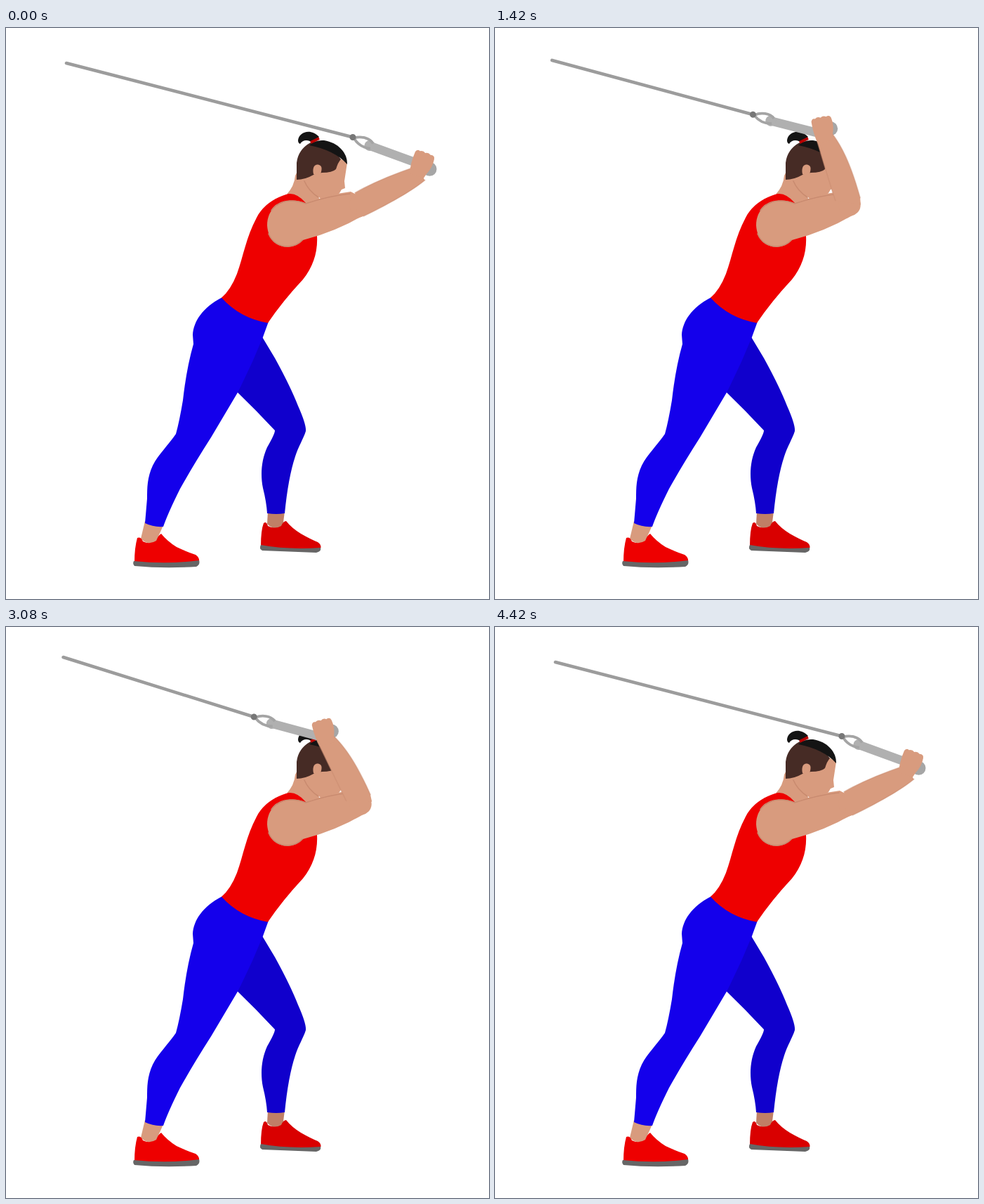
These frames come from a looping animation (688x813 px, 4460 ms). An HTML page:

```html
<!DOCTYPE html>
<html lang="en">
<head>
<meta charset="utf-8">
<title>Cable triceps extension</title>
<style>
html, body { margin: 0; width: 100%; height: 100%; overflow: hidden; background: #fff; }
svg { display: block; width: 688px; height: 813px; }
.skin { fill: #d89b7e; }
.crease { fill: none; stroke: #c98b70; stroke-width: 1.6; stroke-linecap: round; }
</style>
</head>
<body>
<svg viewBox="0 0 688 813">
  <!-- far leg -->
  <path fill="#c07f66" d="M373 688L372 706Q380 715 394 712L397 688Z"/>
  <path fill="#d90000" d="M367 705Q371 702 373 709Q383 714 392 709Q395 702 399 702Q407 712 420 720Q434 728 444 732Q450 736 448 741Q400 743 363 738Q363 715 367 705Z"/>
  <path fill="#666" d="M363 736Q400 743 448 740Q450 745 442 747L365 744Q360 741 363 736Z"/>
  <path fill="#1000cc" d="M362 435L383 470Q405 510 416 538Q428 565 427 574C424 584 416 597 412 610Q402 640 397 691Q385 693 372 691Q371 675 366 655C362 635 364 615 372 597Q383 578 383 573Q357 545 328 517Z"/>
  <!-- near leg -->
  <path class="skin" d="M198 702L192 727Q200 736 213 733L225 706Z"/>
  <path fill="#e00" d="M187 726Q192 724 195 731Q205 736 214 730Q217 722 221 720Q230 731 243 739Q258 746 270 750Q276 754 275 760Q250 766 183 761Q183 740 187 726Z"/>
  <path fill="#666" d="M182 759Q230 764 275 758Q277 764 271 767Q225 770 183 766Q180 763 182 759Z"/>
  <path fill="#1400eb" d="M307 384C280 398 267 418 266 437L267 450Q257 485 252 530Q247 560 242 578C232 593 217 607 209 623C201 640 201 655 201 670L198 705Q210 711 224 710Q231 690 248 656Q267 622 292 583L330 519Q350 480 366 440L374 418L340 385Z"/>
  <!-- head and torso -->
  <path class="skin" d="M412 210Q411 225 399 238L425 255L447 246L445 240L448 243L466 243L475 235L478 230L483 228L482 218L484 205L486 192L450 170L420 195Z"/>
  <path class="crease" d="M425 218Q431 232 445 241"/>
  <path fill="#462b25" d="M414 216L414 192Q416 173 434 163Q462 165 477 187Q473 191 470 201Q465 206 450 206L438 209Q426 216 414 216Z"/>
  <path fill="#141414" d="M432 167Q440 159 453 160C473 163 487 178 486 194Q468 174 432 167ZM416 160C417 148 434 142 446 155L437 164C432 159 423 158 419 165Q416 164 416 160Z"/>
  <path stroke="#b80000" stroke-width="4" d="M434 163L446 157"/>
  <path class="skin" d="M438 208C436 198 440 193 446 195C453 197 448 208 446 214Z"/>
  <path fill="#e00" d="M403 236C385 240 366 252 357 270C342 298 338 325 329 350Q320 373 307 384Q333 413 373 420Q394 389 423 358Q445 330 443 296L427 249Q415 235 403 236Z"/>
  <!-- cable, handle, arm -->
  <path id="cable" stroke="#9c9c9c" stroke-width="4.6" stroke-linecap="round"/>
  <g id="bar">
    <path stroke="#b0b0b0" stroke-width="12.5" d="M0 0H70"/>
    <circle r="7.5" fill="#b0b0b0"/>
  </g>
  <g id="loop">
    <path fill="none" stroke="#a4a4a4" stroke-width="3.8" d="M-22 -11C-12 -14 0 -11 5 -3M-22 -10C-17 -2 -10 3 1 4"/>
    <circle cx="-24" cy="-12" r="4.5" fill="#777"/>
  </g>
  <circle id="knob" r="10" fill="#a6a6a6"/>
  <path class="skin" d="M427 250Q412 243 398 247C380 252 372 265 372 281C373 300 385 312 402 312Q415 311 423 302Q470 290 512 265L518 247L491 233Q458 237 427 250Z"/>
  <path class="crease" d="M374 293C380 307 392 311 402 311Q415 310 422 302M378 260Q386 247 404 246Q417 246 427 250Q460 239 490 236"/>
  <circle class="skin" cx="505" cy="252" r="15.7"/>
  <path class="skin" id="forearm"/>
  <path class="crease" id="edge" stroke-opacity=".5"/>
  <path class="skin" id="fist" d="M-15 -12Q-13 -17 -9 -15Q-5 -18 -1 -15Q3 -18 7 -15Q13 -17 14 -11Q16 0 11 12L9 20L-12 20Q-16 5 -15 -12Z"/>
</svg>
<script>
const $ = id => document.getElementById(id);
const { PI, sin, cos, min, max } = Math;
const LOOP = 4460, REST = 130, STEP = 41.65;
const ELBOW_X = 498, ELBOW_Y = 248, REACH = 110;
const OPEN = 30.3, SWING = 102.7;

const ease = p => (1 - cos(PI * p)) / 2;
const progress = (t, from, to) => min(1, max(0, (t - from) / (to - from)));
const place = (id, x, y, turn = 0) =>
  $(id).setAttribute('transform', `translate(${x} ${y}) rotate(${turn})`);

function pose(t) {
  // The bend starts briskly and settles slowly; the return is an even swing
  const p = progress(t, REST, 2330);
  const bending = t < 2500;
  const bend = bending ? ease(p * (1.29 - 0.29 * p)) : 1 - ease(progress(t, 2560, 4420));
  const angle = OPEN + SWING * bend;
  const rad = angle * PI / 180, c = cos(rad), s = sin(rad);

  const handX = ELBOW_X + REACH * c, handY = ELBOW_Y - REACH * s;
  const barX = handX - 75, barY = handY + min(-10, (angle - 155) / 5);
  const tilt = 13.5 + 0.0021 * (angle - 86) ** 2;
  const loopTurn = (tilt - 20) * 1.2, turn = loopTurn * PI / 180;
  const dotX = barX - 24 * cos(turn) + 12 * sin(turn);
  const dotY = barY - 24 * sin(turn) - 12 * cos(turn);

  // The far end of the cable sways as it is pulled
  const late = sin(PI * bend ** 3);
  const farX = 86 - (bending ? 5 * late : 8 * sin(PI * bend));
  const farY = 50 - (bending ? 5.5 * sin(PI * bend) : 7 * late);

  // Point along the forearm (x) and across it (y), bending towards the wrist
  const at = (x, y) => {
    const n = y + (angle - 90) * 0.16 * (x / 95) ** 2;
    return `${ELBOW_X + x * c - n * s} ${ELBOW_Y - x * s - n * c}`;
  };
  const inner = `${at(6, 12)}C${at(35, 13)} ${at(65, 12)} ${at(100, 11)}`;
  const outer = `${at(101, -12)}C${at(78, -20)} ${at(50, -24)} ${at(0, -23)}`;

  $('cable').setAttribute('d', `M${farX} ${farY}L${dotX} ${dotY}`);
  place('bar', barX, barY, tilt);
  place('loop', barX, barY, loopTurn);
  place('knob', handX + 10.5, handY + max(1, (90 - angle) * 0.14));
  $('forearm').setAttribute('d', `M${inner}L${outer}L${at(-10, -21)}Z`);
  $('edge').setAttribute('d', `M${inner}M${outer}`);
  place('fist', handX, handY, (78 - angle) * 0.42);
}

function frame(now) {
  const step = Math.floor((now % LOOP - REST + 8) / STEP);
  pose(REST + max(0, step) * STEP);
  requestAnimationFrame(frame);
}
frame(performance.now());
</script>
</body>
</html>
```
